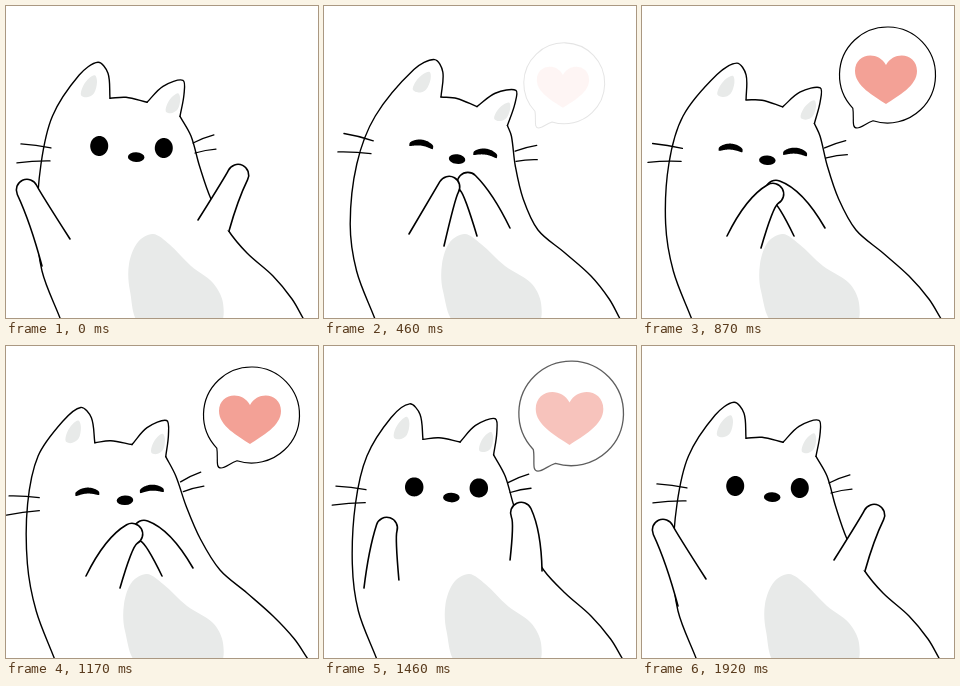
Animation, 312 px wide and 312 px high, one loop 2000 ms. Source, as an HTML page with a canvas:

```html
<!DOCTYPE html>
<html lang="en">
<head>
<meta charset="utf-8">
<title>Happy cat</title>
<style>
  html, body { margin: 0; width: 100%; height: 100%; overflow: hidden; background: #fff; }
  canvas { display: block; }
</style>
</head>
<body>
<canvas id="stage" width="312" height="312"></canvas>
<script>
const ctx = document.getElementById('stage').getContext('2d');
const LOOP = 2000, GREY = '#e8eae9', PINK = '#f3a196';
const rad = degrees => degrees * Math.PI / 180;

// head: x, y, face tilt, crown tilt; arms: outer end, paw centre, inner end, paw angle;
// mood: how tight the hug is, how open the eyes are.
const poses = {
  rest: { head: [125.5, 141, 1.8, 0], mood: [0, 1],
    left: [36, 260, 21, 184, 64, 233, -115], right: [223, 225, 232, 169, 192, 214, -64] },
  closing: { head: [127.5, 141, 5.2, 4.6], mood: [0.5, 0.35],
    left: [63, 234, 69, 179, 99, 238, -112], right: [197, 219, 197, 169, 165, 225, -60] },
  meet: { head: [129.5, 142.5, 8, 8.8], mood: [1, 0],
    left: [85, 228, 125, 181, 120, 240, -60], right: [186, 222, 144, 177, 153, 230, -135] },
  clasp: { head: [121, 144, 3.6, 4.6], mood: [1, 0],
    left: [85, 230, 131, 188, 119, 242, -30], right: [183, 222, 134, 185, 152, 230, -160] },
  opening: { head: [122.5, 141.5, 0.9, -2.1], mood: [0.3, 0.93],
    left: [40, 242, 63, 182, 75, 234, -72], right: [218, 225, 197, 167, 186, 214, -115] }
};
const slide = (arm, dx) => arm.map((n, i) => i < 6 && i % 2 === 0 ? n + dx : n);
poses.lean = { ...poses.clasp, head: [113.5, 144.5, -2.6, -3.3],
  left: slide(poses.clasp.left, -5), right: slide(poses.clasp.right, 4) };

const sway = [[40, 'rest'], [290, 'closing'], [460, 'meet'], [870, 'clasp'],
  [1170, 'lean'], [1460, 'opening'], [1660, 'rest']];
const paws = [[40, 'rest'], [290, 'closing'], [460, 'meet'], [600, 'clasp'], [870, 'clasp'],
  [1170, 'lean'], [1230, 'lean'], [1460, 'opening'], [1640, 'rest']];

// Monotone cubic interpolation of one part between poses.
function sample(part, clock, t) {
  const last = clock.length - 1;
  if (t <= clock[0][0] || t >= clock[last][0]) return poses.rest[part];
  const i = clock.findIndex(k => k[0] > t) - 1;
  const span = clock[i + 1][0] - clock[i][0];
  const u = (t - clock[i][0]) / span, v = 1 - u;
  return poses.rest[part].map((_, n) => {
    const val = k => poses[clock[k][1]][part][n];
    const rate = k => k < 0 || k >= last ? 0 : (val(k + 1) - val(k)) / (clock[k + 1][0] - clock[k][0]);
    const slope = k => {
      const a = rate(k - 1), b = rate(k);
      return a * b > 0 ? 2 * a * b / (a + b) : 0;
    };
    return val(i) + (val(i + 1) - val(i)) * u * u * (3 - 2 * u)
      + span * u * v * (slope(i) * v - slope(i + 1) * u);
  });
}

const dist = (a, b) => Math.hypot(a[0] - b[0], a[1] - b[1]);

// Smooth curve through points.
function curve(pts, closed) {
  const n = pts.length;
  const at = i => pts[closed ? (i + n) % n : Math.max(0, Math.min(n - 1, i))];
  const handle = (i, len) => {
    const a = at(i - 1), p = at(i), b = at(i + 1);
    const k = len / 3 / (dist(a, p) + dist(p, b));
    return [p[0] + (b[0] - a[0]) * k, p[1] + (b[1] - a[1]) * k];
  };
  ctx.beginPath();
  ctx.moveTo(...pts[0]);
  for (let i = 0; i < (closed ? n : n - 1); i++) {
    const len = dist(at(i), at(i + 1));
    ctx.bezierCurveTo(...handle(i, len), ...handle(i + 1, -len), ...at(i + 1));
  }
}

function fill(color) { ctx.fillStyle = color; ctx.fill(); }

function stroke(width) { ctx.lineWidth = width; ctx.stroke(); }

function placed(x, y, angle, size, paint) {
  ctx.save();
  ctx.translate(x, y);
  ctx.rotate(angle);
  ctx.scale(size, size);
  paint();
  ctx.restore();
}

// A round paw whose sides leave along its direction; side is -1 for left, 1 for right.
function arm([ox, oy, x, y, ix, iy, degrees], side) {
  const r = 10.7, a = rad(degrees), turn = side * Math.PI / 2;
  const edge = (angle, back) => [x + r * Math.cos(angle) - back * Math.cos(a), y + r * Math.sin(angle) - back * Math.sin(a)];
  ctx.beginPath();
  ctx.moveTo(ox, oy);
  ctx.quadraticCurveTo(...edge(a + turn, 0.4 * dist([ox, oy], [x, y])), ...edge(a + turn, 0));
  ctx.arc(x, y, r, a + turn, a - turn, side > 0);
  ctx.quadraticCurveTo(...edge(a - turn, 6), ix, iy);
  fill('#fff');
  stroke(1.6);
}

function earPatch() {
  curve([[6, -11], [8, -4], [5, 7], [-2, 11], [-8, 9], [-6, 0], [0, -8]], true);
  fill(GREY);
}

function body(cx, cy, tilt, dx, hug) {
  const c = Math.cos(tilt), s = Math.sin(tilt);
  const crown = (x, y) => [cx + x * c - y * s, cy + x * s + y * c];
  const side = (x, y, squeeze, lean) => [x - squeeze * hug + lean * dx, y];
  const earIn = crown(-30.5, 27), earMid = crown(6.5, 31), earOut = crown(39.5, 45);
  const lines = [
    [side(54, 312, 4, 0.15), side(36, 265, 4, 0.15), side(31, 218, 6, 0.3), side(35, 158, 5, 0.7),
      side(46.5, 110, 0, 1.2), crown(-61.5, 4), crown(-42.5, -9), crown(-32.5, 2), earIn],
    [earIn, crown(-14.5, 26), earMid],
    [earMid, crown(22.5, 15), crown(42.5, 9), crown(43.5, 23), earOut],
    [earOut, side(185, 130, 2, 1.1), side(193.5, 160, 5, 0.7), side(205, 193, 7, 0.3),
      side(222, 224, 8, 0), [241, 247], [267, 270], side(286, 293, 0, -0.2), side(297, 312, 0, -0.35)]
  ];
  curve([side(147, 228, 6, 0), side(163, 238, 6, 0), side(185, 260, 4, 0), [207, 277], [217, 297], [213, 318],
    side(135, 318, 2, 0), side(124, 285, 5, 0), side(123, 258, 5, 0), side(132, 236, 6, 0)], true);
  fill(GREY);
  placed(...crown(-51.5, 15), tilt, 1, earPatch);
  placed(...crown(32.5, 32), tilt, 0.9, earPatch);
  for (const line of lines) {
    curve(line);
    stroke(1.4);
  }
}

// A disc that flattens into an arched band as it shuts.
function eye(cx, open) {
  const shut = 1 - open, w = 9 + 3 * shut, h = 3 + 7 * open, bend = 3.4 * shut;
  ctx.beginPath();
  for (let a = 0; a < 6.28; a += 0.05) {
    const c = Math.cos(a), s = Math.sin(a);
    ctx.lineTo(cx + w * c, h * Math.sign(s) * Math.abs(s) ** (1 - 0.6 * shut) + bend * (c * c - 0.4));
  }
  fill('#000');
}

function whisker(x1, y1, x2, y2) {
  ctx.beginPath();
  ctx.moveTo(x1, y1);
  ctx.quadraticCurveTo((x1 + x2) / 2, (y1 + y2) / 2 - 1.2, x2, y2);
  stroke(1.3);
}

function face(open) {
  eye(-32.3, open);
  eye(32.3, open);
  ctx.beginPath();
  ctx.ellipse(5, 10, 8.3, 4.8, 0, 0, 7);
  fill('#000');
  whisker(-110.6, 0.4, -80.5, 3.5);
  whisker(-114, 19.5, -81, 16.5);
  whisker(61.4, -5.9, 82, -14.6);
  whisker(63.7, 4, 84.5, -0.6);
}

// Grows from the tip of its tail, later swells and fades.
function bubble(t) {
  const p = Math.min(1, (t - 430) / 200), q = Math.max(0, (t - 1380) / 220);
  if (p <= 0 || q >= 1) return;
  const size = q ? 1 + 0.15 * (1 - (1 - q) ** 2) : 1 - 0.22 * (1 - p) ** 2;
  const [ox, oy] = q ? [227, 87] : [212, 122];
  ctx.globalAlpha = p ** 1.2 * (1 - q);
  placed(ox, oy, 0, size, () => {
    ctx.translate(-ox, -oy);
    ctx.beginPath();
    ctx.arc(245.5, 69, 48, rad(136.4), rad(467.5));
    ctx.bezierCurveTo(224, 117, 220, 122, 215, 122);
    ctx.bezierCurveTo(209, 122, 212.5, 112, 210.8, 102.2);
    stroke(1.2);
    ctx.beginPath();
    for (const k of [-1, 1]) {
      ctx.moveTo(244, 98);
      ctx.bezierCurveTo(244 + 12 * k, 90, 244 + 31 * k, 80, 244 + 31 * k, 65);
      ctx.bezierCurveTo(244 + 31 * k, 47, 244 + 8 * k, 44, 244, 59);
    }
    fill(PINK);
  });
  ctx.globalAlpha = 1;
}

function draw(t) {
  ctx.fillStyle = '#fff';
  ctx.fillRect(0, 0, 312, 312);
  ctx.strokeStyle = '#000';
  ctx.lineCap = ctx.lineJoin = 'round';

  const [x, y, faceTilt, crownTilt] = sample('head', sway, t);
  const [hug, open] = sample('mood', paws, t);
  // The crown travels further than the face as the head tilts.
  body(x + 9 + 1.45 * crownTilt, y - 75.7 + 0.25 * crownTilt, rad(crownTilt), x - poses.rest.head[0], hug);
  placed(x, y, rad(faceTilt), 1, () => face(open));
  arm(sample('right', paws, t), 1);
  arm(sample('left', paws, t), -1);
  bubble(t);
}

const start = performance.now();
function tick() {
  draw((performance.now() - start) % LOOP);
  requestAnimationFrame(tick);
}
tick();
</script>
</body>
</html>
```
